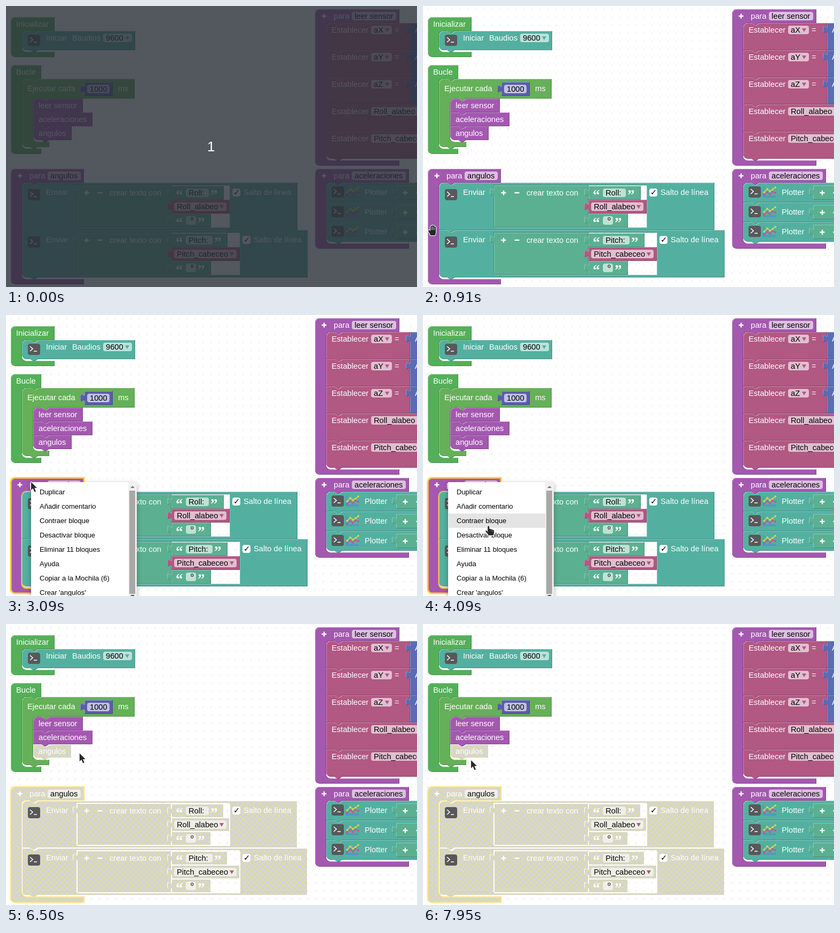
Animation, 770 px wide and 528 px high, one loop 8000 ms. Source, as an HTML page with a canvas:

```html
<!DOCTYPE html>
<html lang="es">
<head>
<meta charset="utf-8">
<style>
html, body { margin: 0; width: 100%; height: 100%; overflow: hidden; background: #fff; }
canvas { display: block; }
</style>
</head>
<body>
<canvas id="stage" width="770" height="528"></canvas>
<script>
const c = document.getElementById('stage').getContext('2d');
const SANS = '"Liberation Sans", Arial, sans-serif';
const GREEN = '#54b058', LOOP = '#65b058', TEAL = '#53b0a0', TEXT = '#5bb092',
      PURPLE = '#a458b0', VAR = '#b15883', NUM = '#5a5cae', SENSOR = '#5a6cb3';
const NOTCH = 'l6 4 3 0 6 -4', TAB = 'l-6 4 -3 0 -6 -4';
const LOOP_MS = 8000, MENU_ON = 3090, MENU_OFF = 4820;
const MENU = ['Duplicar', 'Añadir comentario', 'Contraer bloque', 'Desactivar bloque',
  'Eliminar 11 bloques', 'Ayuda', 'Copiar a la Mochila (6)', "Crear 'angulos'"];

// Cursor stops: time, x, y
const PATH = [[450, -12, 441], [910, 18, 421], [1590, 18, 421], [2000, 38, 297], [2230, 55, 318],
  [2500, 55, 318], [2550, 47, 314], [3500, 47, 314], [4090, 123, 397], [4270, 127, 410],
  [4820, 127, 410], [4860, 127, 417], [5230, 127, 417], [5360, 100, 416], [5500, 100, 416],
  [5900, 158, 300], [6270, 141, 235], [6320, 141, 235], [6500, 138, 243], [6800, 78, 268],
  [7050, 130, 292], [7140, 130, 292], [7500, 45, 353], [7640, 45, 353], [7950, 90, 256]];

function tile(size, draw) {
  const t = document.createElement('canvas');
  t.width = t.height = size;
  draw(t.getContext('2d'));
  return c.createPattern(t, 'repeat');
}
const grid = tile(15, g => {
  g.fillStyle = '#ebebeb';
  g.fillRect(8, 6, 3, 1);
  g.fillRect(9, 5, 1, 3);
});
const hatch = tile(10, g => {
  g.fillStyle = '#d4d4d4';
  g.fillRect(0, 0, 10, 10);
  g.strokeStyle = '#e5e57f';
  g.stroke(new Path2D('M-1 -1L11 11M11 -1L-1 11'));
});

// Block shapes: origin and outline
const statement = (x, y, w, h, top, bottom, hole = '') => ({ x, y, d:
  `M${x} ${y + (top ? 8 : 0)}${top ? 'a8 8 0 0 1 8 -8' : ''}H${x + 15}${NOTCH}H${x + w}V${y + h}` +
  `H${x + 30}${TAB}H${x + (bottom ? 8 : 0)}${bottom ? 'a8 8 0 0 1 -8 -8' : ''}Z${hole}` });
const wrapper = (x, y, w, h, body, foot, linked) => ({ x, y, d:
  `M${x} ${y + 8}a8 8 0 0 1 8 -8${linked ? `H${x + 15}${NOTCH}` : ''}H${x + w}V${y + h}H${x + 51}${TAB}` +
  `H${x + 29}a8 8 0 0 0 -8 8V${y + h + body - 8}a8 8 0 0 0 8 8H${x + foot}v10` +
  `${linked ? `H${x + 30}${TAB}` : ''}H${x + 8}a8 8 0 0 1 -8 -8Z` });
const value = (x, y, w, h) => ({ x, y, d:
  `M${x} ${y}H${x + w}V${y + h}H${x}V${y + 20}c0 -10 -8 8 -8 -7.5s8 2.5 8 -7.5Z` });

function fill(path, style) {
  c.fillStyle = style;
  c.fill(path, 'evenodd');
}

// Fill with a light top-left and a dark bottom-right edge; hatched when disabled
function block({ x, y, d }, color, off) {
  const p = new Path2D(d);
  c.save();
  c.clip(p, 'evenodd');
  if (!off) {
    fill(p, color);
    fill(p, 'rgba(0,0,0,.2)');
  }
  c.translate(-1, -1);
  c.clip(p, 'evenodd');
  fill(p, off ? '#fff' : color);
  if (!off) fill(p, 'rgba(255,255,255,.3)');
  c.translate(2, 2);
  hatch.setTransform(new DOMMatrix([1, 0, 0, 1, x - 1, y - 1]));
  fill(p, off ? hatch : color);
  c.restore();
  return p;
}

function label(s, x, mid, color = '#fff', font = '14.67px ' + SANS) {
  c.font = font;
  c.fillStyle = color;
  c.fillText(s, x, mid + 5);
}

function box(x, y, w, h, color) {
  c.fillStyle = color;
  c.beginPath();
  c.roundRect(x, y, w, h, 4);
  c.fill();
}

function field(s, x, mid, w, arrow) {
  box(x, mid - 8, w, 16, 'rgba(255,255,255,.62)');
  label(s, x + 5, mid, '#000');
  if (arrow) {
    const r = x + w - 4;
    fill(new Path2D(`M${r - 9} ${mid - 3}h8l-4 7z`), arrow);
  }
}

function line(d, color, width) {
  c.strokeStyle = color;
  c.lineWidth = width;
  c.stroke(new Path2D(d));
}

const plus = (x, y) => line(`M${x - 4.5} ${y}h9M${x} ${y - 4.5}v9`, '#fff', 2.4);
const minus = (x, y) => line(`M${x - 4.5} ${y}h9`, '#fff', 2.4);

function terminal(x, mid) {
  box(x, mid - 10, 23, 21, '#58585a');
  line(`M${x + 4} ${mid - 5}l5 4.5 -5 4.5M${x + 11} ${mid + 4}h6`, '#fff', 1.6);
}

function plotIcon(x, y) {
  line(`M${x + 2} ${y}v19h23`, '#4a86d8', 1);
  line(`M${x} ${y + 17}h25`, '#4a86d8', 1);
  const curve = (pts, color) => {
    line('M' + pts.map(([a, b]) => `${x + a} ${y + b}`).join('L'), color, 1.2);
    for (const [a, b] of pts) {
      c.fillStyle = color;
      c.fillRect(x + a - 1.5, y + b - 1.5, 3, 3);
    }
  };
  curve([[3, 15], [9, 10], [14, 14], [19, 9], [24, 11]], '#e0409a');
  curve([[3, 10], [9, 4], [14, 8], [19, 5], [24, 1]], '#f0d93a');
}

function header(name, x, y, w) {
  plus(x + 17, y + 13);
  label('para', x + 35, y + 13);
  field(name, x + 69, y + 13, w);
}

function string(s, y, boxW, off) {
  block(value(310, y, boxW + 55, 26), TEXT, off);
  const quote = 'bold 27px "Liberation Serif", serif';
  label('“', 318, y + 21, '#fff', quote);
  field(s, 337, y + 13, boxW);
  label('”', 337 + boxW + 3, y + 21, '#fff', quote);
}

function send(y, w, name, nameBox, variable, varW, off) {
  const end = 310 + varW;
  const hole = `M133 ${y + 5}H${end}v79H133Z`;
  block(statement(30, y, w, 89, y < 400, y > 400, hole), TEAL, off);
  terminal(41, y + 22);
  label('Enviar', 75, y + 18);
  block(value(133, y + 5, 177, 79), TEXT, off);
  plus(151, y + 19);
  minus(176, y + 19);
  label('crear texto con', 194, y + 19);
  string(name, y + 6, nameBox, off);
  block(value(310, y + 32, varW, 26), VAR, off);
  field(variable, 315, y + 45, varW - 11, VAR);
  string(' º', y + 58, 19, off);
  box(end + 5, y + 11, 15, 15, '#fff');
  label('✓', end + 7, y + 18, '#000', '14.67px "DejaVu Sans", sans-serif');
  label('Salto de línea', end + 26, y + 18);
}

function scene(selected, off) {
  c.fillStyle = '#fff';
  c.fillRect(0, 0, 770, 528);
  c.fillStyle = grid;
  c.fillRect(0, 0, 770, 528);

  block(wrapper(9, 21, 82, 26, 39, 82), GREEN);
  label('Inicializar', 19, 34);
  block(statement(30, 47, 212, 36, true, true), TEAL);
  terminal(41, 64);
  label('Iniciar', 75, 60);
  label('Baudios', 124, 60);
  field('9600', 182, 60, 54, TEAL);

  block(wrapper(9, 111, 57, 26, 131, 57), GREEN);
  label('Bucle', 19, 124);
  block(wrapper(30, 137, 211, 37, 81, 51, true), LOOP);
  label('Ejecutar cada', 40, 155);
  block(value(147, 143, 53, 26), NUM);
  field('1000', 152, 156, 42);
  label('ms', 210, 155);
  [['leer sensor', 93], ['aceleraciones', 111], ['angulos', 72]].forEach(([s, w], i) => {
    block(statement(51, 174 + 26 * i, w, 26, i === 0, i === 2), PURPLE, off && i === 2);
    label(s, 61, 187 + 26 * i);
  });

  block(wrapper(579, 6, 158, 26, 258, 158), PURPLE);
  header('leer sensor', 579, 6, 83);
  ['aX', 'aY', 'aZ', 'Roll_alabeo', 'Pitch_cabeceo'].forEach((s, i) => {
    const y = 32 + 51 * i, small = i < 3;
    block(statement(600, y, small ? 157 : 260, 51, i === 0, i === 4), VAR);
    label('Establecer', 610, y + 13);
    field(s, 684, y + 13, small ? 39 : 118, VAR);
    if (small) {
      label('=', 728, y + 13);
      block(value(757, y, 60, 51), SENSOR);
      label('A', 766, y + 13);
    }
  });

  block(wrapper(579, 306, 176, 26, 114, 176), PURPLE);
  header('aceleraciones', 579, 306, 101);
  for (let i = 0; i < 3; i++) {
    const y = 332 + 37 * i;
    block(statement(600, y, 240, 37, i === 0, i === 2), TEAL);
    terminal(610, y + 17);
    plotIcon(636, y + 8);
    label('Plotter', 672, y + 18);
    block(value(731, y + 5, 100, 27), TEXT);
    plus(748, y + 19);
    minus(773, y + 19);
  }

  const outline = block(wrapper(9, 306, 137, 26, 181, 137), PURPLE, off);
  if (selected) {
    c.strokeStyle = off ? 'rgba(255,204,51,.5)' : '#fc3';
    c.lineWidth = 3;
    c.stroke(outline);
  }
  header('angulos', 9, 306, 62);
  send(332, 516, 'Roll:', 43, 'Roll_alabeo', 109, off);
  send(421, 535, 'Pitch:', 50, 'Pitch_cabeceo', 128, off);
}

function menu(hover) {
  c.save();
  c.shadowColor = 'rgba(0,0,0,.3)';
  c.shadowBlur = 9;
  c.shadowOffsetY = 3;
  c.fillStyle = '#fff';
  c.fillRect(47, 314, 198, 240);
  c.restore();
  MENU.forEach((s, i) => {
    if (i === hover) {
      c.fillStyle = '#e4e4e4';
      c.fillRect(48, 319 + 27 * i, 181, 27);
    }
    label(s, 63, 332 + 27 * i, '#000', '13px ' + SANS);
  });
  c.fillStyle = '#f1f1f1';
  c.fillRect(229, 314, 16, 214);
  c.fillStyle = '#a8a8a8';
  c.fillRect(231, 330, 11, 194);
  fill(new Path2D('M233 325l4 -4 4 4z'), '#777');
  fill(new Path2D('M233 526h8l-4 4z'), '#505050');
}

function position(t) {
  const i = PATH.findIndex(k => k[0] > t);
  if (i === 0) return PATH[0].slice(1);
  if (i < 0) return PATH.at(-1).slice(1);
  const [t0, x0, y0] = PATH[i - 1], [t1, x1, y1] = PATH[i], f = (t - t0) / (t1 - t0);
  return [x0 + (x1 - x0) * f, y0 + (y1 - y0) * f];
}

const ARROW = 'M0 0V15L3.6 11.8 6.4 18.4 9 17.2 6.2 10.8H11Z';
const HAND = 'M-4 10C-5 6 -8 4 -8 1 -7 -1 -5 0 -4 2V-6C-4 -8 -1.6 -8 -1.6 -6V-8C-1.6 -9.5 .8 -9.5 .8 -8V-7' +
  'C.8 -9 3.4 -9 3.4 -7V-5C3.4 -7 6 -7 6 -5V4C6 7 5 8 4.5 10Z';
const POINTER = 'M-1.8 11V1C-1.8 -1.4 1.2 -1.4 1.2 1V5C3 4 4 5 4.5 6 6 5 7 6 7.4 7 9 6 10 7 10 9V12' +
  'C10 14 9 15 8.5 17H0C-1 14 -5 12 -6 9 -5 7 -3 8 -1.8 11Z';

const overBlock = (x, y) => x >= 9 && y >= 306 && y < 523 && x < (y < 332 || y > 510 ? 146 : 546);

function cursor(x, y, open) {
  const shape = open ? (x >= 48 && y >= 319 ? POINTER : ARROW) : overBlock(x, y) ? HAND : ARROW;
  const p = new Path2D(shape);
  c.save();
  c.translate(x, y);
  c.lineJoin = 'round';
  c.lineWidth = 2;
  c.strokeStyle = '#fff';
  c.stroke(p);
  fill(p, '#26282b');
  if (shape === HAND) line('M-1.6 -6V0M.8 -7V0M3.4 -5V0', '#eee', .8);
  if (shape === POINTER) line('M4.5 7v3M7.4 8v3', '#aaa', .6);
  c.restore();
}

function countdown() {
  c.fillStyle = 'rgba(41,46,54,.8)';
  c.fillRect(0, 0, 770, 528);
  label('1', 377, 268, '#fff', '26px ' + SANS);
}

function frame(now) {
  const t = now % LOOP_MS;
  const open = t >= MENU_ON && t < MENU_OFF;
  const [x, y] = position(t);
  scene(t >= MENU_ON, t >= MENU_OFF);
  if (open) menu(x >= 48 ? Math.floor((y - 319) / 27) : -1);
  if (t < 50) countdown();
  else cursor(x, y, open);
}

const start = performance.now();
function tick() {
  frame(performance.now() - start);
  requestAnimationFrame(tick);
}
tick();
</script>
</body>
</html>
```
